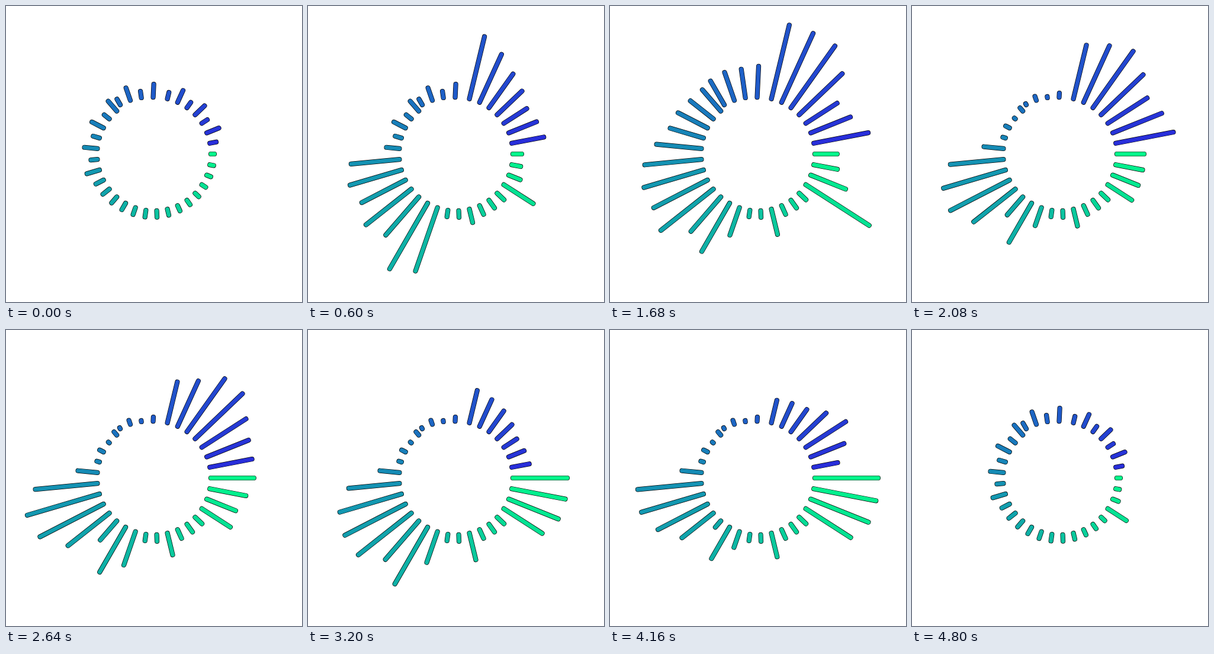
Recreate the animation shown at these times as an HTML page with a canvas. Size 500 by 500 pixels, loop 4840 ms.

```html
<!DOCTYPE html>
<html lang="en">
<head>
<meta charset="utf-8">
<title>Radial equalizer</title>
<style>
  html, body { margin: 0; width: 100%; height: 100%; overflow: hidden; background: #fff; }
  canvas { display: block; width: 500px; height: 500px; }
</style>
</head>
<body>
<canvas id="stage" width="500" height="500"></canvas>
<script>
const LOOP = 4840, STEP = 40, BARS = 33, CENTER = 250, RADIUS = 96;
const ctx = document.getElementById('stage').getContext('2d');

// Key levels per sector, spread evenly over its bars; a missing sector rests
const poses = [
  { at: 0 },
  { at: 600, right: [15, 59], kick: 23, left: [113, 85, 83, 82], upper: [108, 70, 46, 55] },
  { at: 1320, right: [18, 118], kick: 57, left: [87, 81, 21, 67], top: [115, 84, 93], upper: [111, 101, 70, 91] },
  { at: 2080, right: [46, 48], kick: 29, left: [32, 40, 112, 90], hush: true, upper: [93, 117, 79, 99] },
  { at: 3200, right: [92, 77], kick: 46, left: [55, 86, 115, 86], hush: true, upper: [56, 43, 26, 30] },
  { at: 4160, right: [107, 90], kick: 41, left: [28, 14, 94, 108], hush: true, upper: [39, 46, 80, 41] },
  { at: 4800, right: [6, 37] }
];

const mix = (a, b, u) => a + (b - a) * u;

// Piecewise linear curve through evenly spaced points, u from 0 to 1
function curve(points, u) {
  const s = u * (points.length - 1);
  const k = Math.min(Math.floor(s), points.length - 2);
  return mix(points[k], points[k + 1], s - k);
}

const rest = i => i < 15 ? 6 + 0.6 * i : i % 2 ? 22 : 11;

function level(pose, i) {
  const odd = i % 2;
  if (i < 4 && pose.right) return mix(...pose.right, (i / 3) ** 5);
  if (i > 3 && i < 10 && pose.kick) return i === 7 ? pose.kick : i < 7 ? 16 : 11;
  if (i > 9 && i < 17 && pose.left) {
    return curve(pose.left, (i - 10) / 6) + (odd ? 40 / (i - 10) : 0);
  }
  if (i > 16 && i < 26) {
    if (pose.top) return curve(pose.top, (i - 17) / 8);
    if (pose.hush) return 2 + 5 * odd + 26 * 0.1 ** (i - 17);
  }
  if (i > 25 && pose.upper) return curve(pose.upper, (i - 26) / 6);
  return rest(i);
}

const lively = i => i < 4 || (i > 9 && i < 17) || i > 25;

function lengthAt(i, t) {
  let k = 0;
  while (k < poses.length - 2 && t >= poses[k + 1].at) k++;
  const from = poses[k], to = poses[k + 1];
  const u = (t - from.at) / (to.at - from.at);
  // Quick attack out of the quiet pose, late fall back into it
  const eased = k === 0 ? Math.sqrt(u) : k === poses.length - 2 ? u ** 3 : u;
  const len = mix(level(from, i), level(to, i), eased);
  if (!lively(i)) return len;
  const beat = Math.sin(t / 90 + i * 0.55) + 0.5 * Math.sin(t / 41 + i * 1.3);
  return Math.max(5, Math.min(128, len + Math.sin(Math.PI * u) * (12 + 22 * beat)));
}

// The bars just before the top sit a little to the left
const shift = i => i > 21 && i < 26 ? (i - 22) ** 2 / 3 - 9 : 0;

function line(x, y, dx, dy, width, color) {
  ctx.lineWidth = width;
  ctx.strokeStyle = color;
  ctx.beginPath();
  ctx.moveTo(x, y);
  ctx.lineTo(x + dx, y + dy);
  ctx.stroke();
}

function draw(t) {
  ctx.fillStyle = '#fff';
  ctx.fillRect(0, 0, 500, 500);
  ctx.lineCap = 'round';
  for (let i = 0; i < BARS; i++) {
    const a = i / BARS * 2 * Math.PI, c = Math.cos(a), s = Math.sin(a);
    const x = CENTER + RADIUS * c + shift(i), y = CENTER + RADIUS * s;
    const len = lengthAt(i, t), p = i / (BARS - 1);
    const color = `rgb(${mix(0, 40, p)}, ${mix(245, 46, p)}, ${mix(140, 218, p)})`;
    line(x, y, c * len, s * len, 8.2, '#000');
    line(x, y, c * len, s * len, 6.8, color);
  }
}

const start = performance.now();
function tick() {
  const t = (performance.now() - start) % LOOP;
  draw(Math.floor(t / STEP) * STEP);
  requestAnimationFrame(tick);
}
tick();
</script>
</body>
</html>
```
